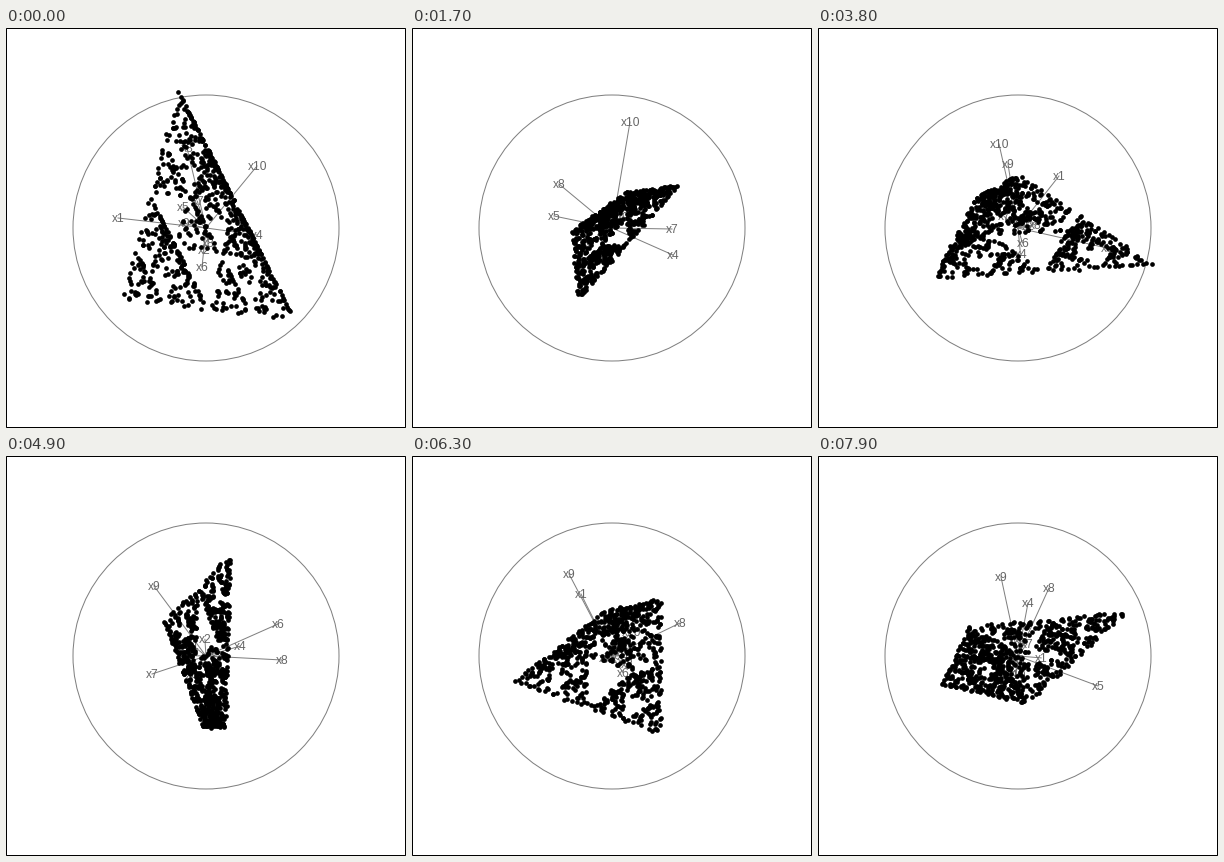
Recreate the animation shown at these times as a matplotlib script. Size 400 px wide and 400 px high, loop 8 s.

```python
import numpy as np
import matplotlib.pyplot as plt
from itertools import product
from matplotlib.animation import FuncAnimation
from matplotlib.patches import Circle, Rectangle

SIZE, DPI = 400, 100
PX = 72 / DPI            # points per pixel
STEP, FRAMES = 100, 80   # ms per step, steps per loop
SPEED = 0.000676         # tour speed, radians per ms
MID = SIZE / 2
GREY = "#7f7f7f"
AXES = 10

# Key projections as x + yj from the centre: three corners of the
# tetrahedron, then the long axes by number.
POSES = {
    0: ([-29-139j, 88+91j, -85+73j],
        {1: -88-10j, 3: -19-80j, 4: 51+7j, 6: -4+39j, 10: 51-62j}),
    1700: ([67-43j, -34+72j, -41+3j],
           {4: 61+27j, 5: -58-12j, 7: 60+1j, 8: -53-44j, 10: 18-106j}),
    3000: ([156+9j, -99+45j, -17-39j],
           {1: 37-33j, 3: 107+1j, 9: 16-48j, 10: -18-108j}),
    3800: ([138+37j, -85+51j, 0-54j],
           {1: 41-52j, 3: 89+20j, 9: -10-64j, 10: -19-84j}),
    4900: ([-3+72j, 20+72j, 25-103j],
           {6: 72-32j, 7: -54+18j, 8: 76+4j, 9: -52-70j}),
    5450: ([-38+67j, 31+74j, 36-110j], {}),
    6300: ([-99+26j, 49+79j, 50-58j],
           {1: -31-62j, 8: 68-33j, 9: -43-82j}),
    7250: ([-115+28j, 28+67j, 105-52j], {}),
    7900: ([-77+29j, 9+48j, 111-45j],
           {4: 10-53j, 5: 80+30j, 8: 31-68j, 9: -17-79j}),
}

rng = np.random.default_rng(4)


def all_corners(corners):
    """The data is centred, so the fourth corner balances the others."""
    return np.array(corners + [-np.dot([0.92, 1, 1], corners)])


def all_tips(long_axes):
    """Axes that are not listed stay short."""
    tips = rng.normal(0, 14, AXES) + 1j * rng.normal(0, 14, AXES)
    for n, tip in long_axes.items():
        tips[n - 1] = tip
    return tips


def gasket(levels=4, copies=3, tail=6):
    """Barycentric weights of points spread over a Sierpinski tetrahedron."""
    cells = np.repeat(list(product(range(4), repeat=levels)), copies, axis=0)
    picks = np.hstack([cells, rng.integers(0, 4, (len(cells), tail))])
    halves = 0.5 ** np.arange(1, levels + tail + 1)
    weights = np.einsum("pdk,d->pk", np.eye(4)[picks], halves)
    return weights / halves.sum()


def pose(keys, t):
    """Rotate from one key projection to the next at constant speed."""
    times = list(keys)
    i = min(np.searchsorted(times, t, side="right"), len(times) - 1)
    start, end = times[i - 1], times[i]
    mix = (keys[start] * np.sin(SPEED * (end - t))
           + keys[end] * np.sin(SPEED * (t - start)))
    return mix / np.sin(SPEED * (end - start)) + MID * (1 + 1j)


corner_keys = {t: all_corners(c) for t, (c, _) in POSES.items()}
tip_keys = {t: all_tips(a) for t, (_, a) in POSES.items() if a}
weights = gasket()

fig = plt.figure(figsize=(SIZE / DPI, SIZE / DPI), dpi=DPI, facecolor="white")
ax = fig.add_axes([0, 0, 1, 1])
ax.set(xlim=(0, SIZE), ylim=(SIZE, 0))
ax.axis("off")

ax.add_patch(Rectangle((0.5, 0.5), SIZE - 1, SIZE - 1, fill=False,
                       ec="black", lw=PX, snap=False))
ax.add_patch(Circle((MID, MID), 133, fill=False, ec=GREY, lw=PX))
spokes = [ax.plot([], [], color=GREY, lw=PX, zorder=2)[0] for _ in range(AXES)]
labels = [
    ax.text(0, 0, f"x{n + 1}", color="#666666", size=12 * PX,
            family="Liberation Sans", ha="center", va="center", zorder=3)
    for n in range(AXES)
]
dots, = ax.plot([], [], "o", color="black", ms=4.7 * PX, mew=0, zorder=4)
dots.set_snap(False)


def update(frame):
    t = frame * STEP
    points = weights @ pose(corner_keys, t)
    dots.set_data(points.real, points.imag)
    for spoke, label, tip in zip(spokes, labels, pose(tip_keys, t)):
        spoke.set_data([MID, tip.real], [MID, tip.imag])
        label.set_position((tip.real + 0.5, tip.imag + 1))
    return [dots, *spokes, *labels]


anim = FuncAnimation(fig, update, frames=FRAMES, interval=STEP,
                     repeat=True, repeat_delay=0, blit=False)
plt.show()
```
